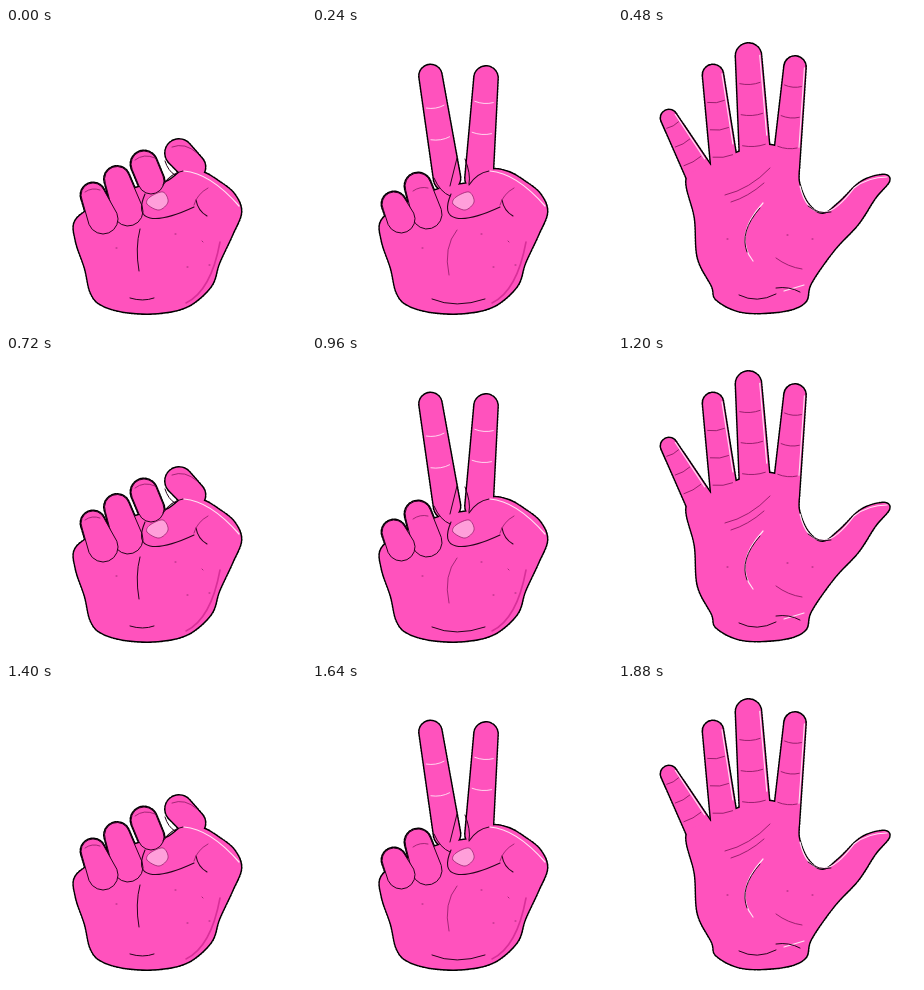
An HTML page with a canvas that plays this animation: 300x300 px, repeating every 2.08 s.

```html
<!DOCTYPE html>
<html lang="en">
<head>
<meta charset="utf-8">
<title>Rock, scissors, paper</title>
<style>
  html, body { margin: 0; height: 100%; overflow: hidden; background: #fff; }
  canvas { display: block; width: 100vw; height: 100vh; }
</style>
</head>
<body>
<canvas width="300" height="300"></canvas>
<script>
const ctx = document.querySelector("canvas").getContext("2d");
const PINK = "#ff52bd", INK = "#25051b", FINE = "#8c1c64", SHADE = "#d82f98", LIGHT = "#ffe3f4";

// Closed smooth curve through points.
function blob(...points) {
  const path = new Path2D(), n = points.length;
  path.moveTo(...points[0]);
  points.forEach(([x, y], i) => {
    const [px, py] = points[(i + n - 1) % n];
    const [qx, qy] = points[(i + 1) % n];
    const [rx, ry] = points[(i + 2) % n];
    path.bezierCurveTo(x + (qx - px) / 6, y + (qy - py) / 6, qx - (rx - x) / 6, qy - (ry - y) / 6, qx, qy);
  });
  return { path };
}

// Tapered capsule; crease is where the first fold lies, counted from the tip.
function finger(tip, tipRadius, base, baseRadius, crease) {
  const path = new Path2D(), q = Math.PI / 2;
  const angle = Math.atan2(tip[1] - base[1], tip[0] - base[0]);
  path.arc(...tip, tipRadius, angle - q, angle + q);
  path.arc(...base, baseRadius, angle + q, angle + 3 * q);
  path.closePath();
  const at = (t, side) => {
    const r = (tipRadius + (baseRadius - tipRadius) * t) * side;
    return [tip[0] + (base[0] - tip[0]) * t - Math.sin(angle) * r,
            tip[1] + (base[1] - tip[1]) * t + Math.cos(angle) * r];
  };
  return { path, at, crease };
}

const knuckle = (...shape) => ({ ...finger(...shape), edge: true });

function stroke(path, color, width) {
  ctx.strokeStyle = color;
  ctx.lineWidth = width;
  ctx.stroke(path);
}

function curve(color, width, d) {
  stroke(new Path2D(d), color, width);
}

function creases({ at, crease }, count, color) {
  for (let i = 0; i < count; i++) {
    const t = crease + i * .31;
    const path = new Path2D();
    path.moveTo(...at(t, -.8));
    path.quadraticCurveTo(...at(t + .03, 0), ...at(t, .75));
    stroke(path, color, .9);
  }
}

function skin(shapes) {
  ctx.setLineDash([1.5, 1.5]);
  shapes.forEach(({ path }) => stroke(path, "#000", 3));
  ctx.setLineDash([]);
  ctx.fillStyle = PINK;
  shapes.forEach(({ path, edge }) => {
    ctx.fill(path);
    if (edge) stroke(path, INK, 1);
  });
}

const fist = blob([70, 192], [70, 213], [79, 240], [85, 265], [96, 277], [120, 284], [152, 285],
  [182, 278], [205, 258], [213, 235], [226, 207], [235, 184], [228, 166], [212, 153],
  [196, 144], [178, 142], [160, 154], [130, 160], [95, 175]);

const openPalm = blob([69, 150], [77, 190], [80, 230], [94, 258], [99, 272], [125, 284], [165, 283],
  [187, 274], [193, 255], [216, 222], [240, 196], [257, 170], [271, 153], [265, 147],
  [243, 154], [222, 174], [205, 186], [190, 176], [181, 155], [178, 130], [151, 117],
  [121, 124], [94, 137]);

const openFingers = [
  finger([51, 90], 8, [83, 148], 14, .12),
  finger([95, 47], 10, [106, 135], 13, .3),
  finger([130.5, 28], 12.5, [137, 128], 15, .27),
  finger([177, 39], 10.5, [168, 138], 13, .19)
];

const raised = [
  finger([118.5, 48], 11, [135, 150], 13, .3),
  finger([174, 50], 11.5, [167, 150], 13.5, .24)
];

function thumb() {
  curve(INK, 1.1, "M157 157Q165 145 177 143M139 166Q130 187 144 190Q158 193 188 179M190 172Q192 183 201 188");
  curve(LIGHT, 1.2, "M178 143Q204 145 233 178");
  curve(FINE, .8, "M188 177Q191 166 202 160M169 206h1M196 213l1 1M203 237h1M181 239h1M110 220h1");
  ctx.fillStyle = "#ff9fda";
  const nail = blob([141, 176], [144, 169], [157, 164], [162, 174], [153, 182]);
  ctx.fill(nail.path);
  stroke(nail.path, FINE, .7);
  curve(SHADE, 1.6, "M214 214Q205 263 180 275");
}

function rock() {
  skin([
    finger([173, 125], 13.5, [186, 139], 13),
    fist,
    knuckle([138, 136], 13, [145, 153], 13),
    knuckle([111, 151], 12.5, [122, 183], 15),
    knuckle([87, 167], 12, [97, 191], 15)
  ]);
  curve(INK, 1, "M159 133Q162 143 169 147M124 270Q137 274 148 270M134 201Q129 220 133 243");
  curve(FINE, .8, "M79 164Q86 159 94 162M129 132Q138 125 149 130M166 119Q179 114 191 125");
  thumb();
}

function scissors() {
  skin([
    ...raised,
    fist,
    knuckle([106, 158], 13, [115, 186], 15),
    knuckle([82, 176], 12, [89, 191], 14)
  ]);
  raised.forEach(shape => creases(shape, 2, LIGHT));
  curve(INK, 1, "M122 150Q128 164 138 168M145 130L138 158M153 131Q159 146 157 156M120 271Q144 281 173 271");
  curve(FINE, .8, "M145 202Q131 219 137 247M101 163Q108 158 116 160");
  thumb();
}

function paper() {
  skin([...openFingers, openPalm]);
  openFingers.forEach(shape => {
    const side = new Path2D();
    side.moveTo(...shape.at(0, .9));
    side.lineTo(...shape.at(.8, .9));
    stroke(side, LIGHT, 1.1);
    creases(shape, 3, FINE);
  });
  curve(LIGHT, 1.2, "M182 158Q188 185 206 184Q218 184 236 160Q250 149 269 149M145 175Q115 208 135 233M186 257L166 263");
  curve(FINE, .9, "M107 167Q132 161 152 140M113 174Q130 169 146 155M158 230Q170 239 184 241M109 211h1M169 207h1M194 211h1");
  curve(INK, 1, "M142 180Q121 204 129 224M121 267Q139 276 158 266M158 260Q171 258 182 264M190 178Q201 187 213 184");
}

const poses = [rock, scissors, paper];
const starts = [0, 240, 480, 720, 960, 1200, 1400, 1640, 1880];
ctx.lineCap = "round";

function draw() {
  const time = performance.now() % 2080;
  const step = starts.filter(start => start <= time).length - 1;
  ctx.clearRect(0, 0, 300, 300);
  poses[step % 3]();
  requestAnimationFrame(draw);
}
draw();
</script>
</body>
</html>
```
